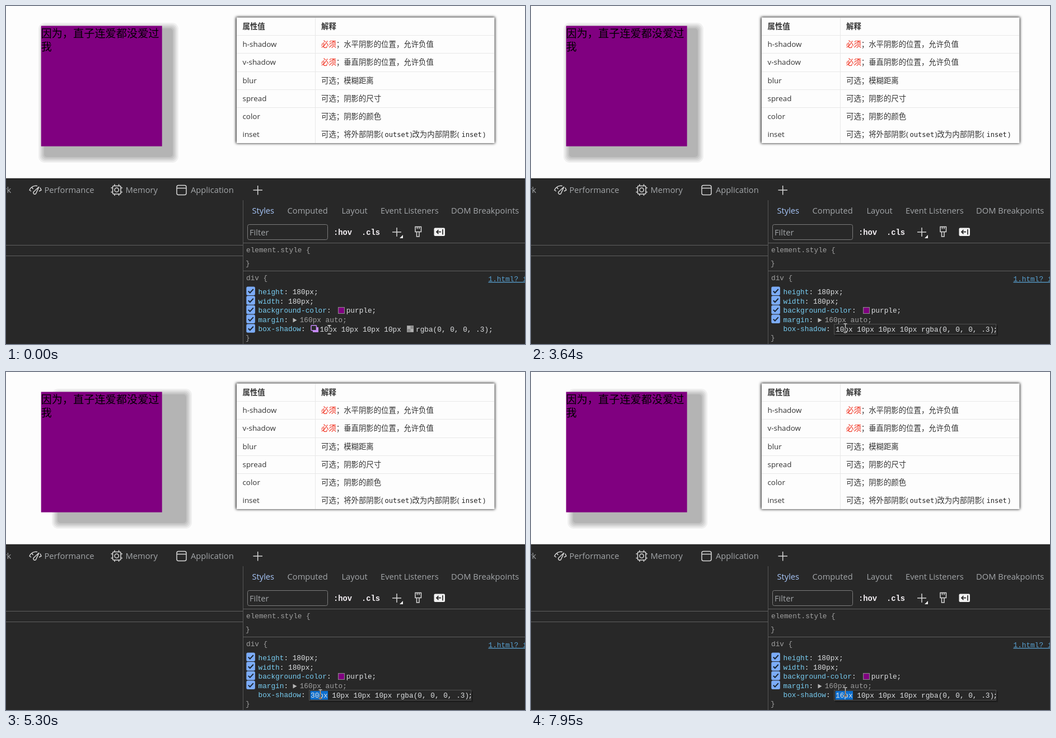
An HTML page for the animation above (8000 ms loop, 927x604 px).

```html
<!DOCTYPE html>
<html lang="zh-CN">
<head>
<meta charset="utf-8">
<title>box-shadow</title>
<style>
  html, body { margin: 0; width: 100%; height: 100%; overflow: hidden; background: #fdfdfd; }
  svg { display: block; width: 100vw; height: 100vh; }
  .cjk { font-family: 'Open Sans', 'Noto Sans CJK SC', 'Noto Sans CJK', sans-serif; font-size: 13.4px; fill: #333; }
  .big { font-size: 19.2px; fill: #000; }
  .ui { font-family: 'Open Sans', 'Noto Sans', sans-serif; font-size: 14.7px; fill: #a3a6a9; }
  .code { font-family: 'Liberation Mono', 'Noto Sans Mono', monospace; font-size: 12.75px; fill: #dcdee0; }
  .inline { font-family: 'DejaVu Sans Mono', monospace; font-size: 12.1px; fill: #222; }
  .button { font-size: 13.8px; font-weight: 700; fill: #f4f0f4; }
  .prop { fill: #78cdf2; }
  .dim { fill: #a0a0a0; }
  .link { fill: #58a0d0; text-decoration: underline; }
  .active { fill: #a8c7fa; }
  .must { fill: #f0220f; }
  .head { font-weight: 700; }
  .icon { fill: none; stroke: #d6d6d6; stroke-width: 1.5; }
  #cursor { fill: none; stroke: #fff; stroke-width: 1.3; mix-blend-mode: difference; }
</style>
</head>
<body>
<svg viewBox="0 0 927 604" preserveAspectRatio="none">
  <defs>
    <filter id="soft" x="-5%" y="-8%" width="110%" height="116%"><feGaussianBlur stdDeviation="2.8"/></filter>
  </defs>
  <rect width="927" height="604" fill="#fdfdfd"/>

  <g id="shadow"></g>
  <rect x="62.7" y="35.5" width="216" height="215.2" fill="purple"/>
  <text class="cjk big" x="62.5" y="55.5">因为，直子连爱都没爱过</text>
  <text class="cjk big" x="62.5" y="80.3">我</text>

  <rect x="411" y="20" width="462" height="225" filter="url(#soft)"/>
  <rect x="412" y="20.5" width="460.5" height="224.5" fill="#fdfdfd"/>
  <g id="table" class="cjk"></g>

  <rect y="307.8" width="927" height="297" fill="#282828"/>
  <path d="M0 427.5H424M0 446.5H424M424 423.5H927M424 473.5H927" stroke="#606060"/>
  <path d="M423.5 347V604" stroke="#565656"/>
  <rect x="431.5" y="390.5" width="143" height="27" rx="3" fill="none" stroke="#7c7c7c"/>
  <g id="labels" class="ui"></g>

  <g class="icon">
    <path d="M45 331l-3-2a12 12 0 0 1 14-7.5M61 324.5l2 4.5-4 2M46 324l2.5 3M50 331.5a2.6 2.6 0 1 0 4 2.5l5-11z"/>
    <rect x="190.5" y="321.5" width="14.5" height="14.5" rx="2"/>
    <circle cx="197.7" cy="328.7" r="3.6"/>
    <path d="M194 318.5v3M201.5 318.5v3M194 336v3M201.5 336v3M187.5 325h3M187.5 332.5h3M205 325h3M205 332.5h3"/>
    <rect x="305" y="320.5" width="17" height="17" rx="3"/>
    <path d="M305 325.5h17M441.5 329H458M449.7 321v16.5M690 404h16M698 396v16"/>
    <path d="M731 394.5h10.5v9H731zM734.5 394.5v4M738 394.5v4M733.5 403.5v8.5h4.5v-8.5"/>
  </g>
  <path d="M709 409v6h-6z" fill="#eee"/>
  <rect x="764.5" y="396.5" width="19.5" height="14.5" rx="2" fill="#f2f2f2"/>
  <path d="M780 399v9.500M777 403.700h-8M772.500 400.200L769 403.700l3.500 3.500" fill="none" stroke="#282828" stroke-width="1.7"/>

  <g id="code" class="code"></g>
  <g id="checks"></g>
  <rect x="593.5" y="538.500" width="11" height="11" fill="purple" stroke="#8d8d8d"/>
  <path d="M512.5 557.5v8l7-4z" fill="#b8b8b8"/>

  <g id="view">
    <path d="M548 574h10v9h-10z" fill="#c58af9"/>
    <rect x="545" y="570.7" width="9.5" height="9" rx="1" fill="#282828" stroke="#c58af9" stroke-width="1.5"/>
    <rect x="716.5" y="571.5" width="11" height="11" fill="#8b8b8b" stroke="#999"/>
    <path d="M717 572h5.5v5H717zM722.5 577h5.5v5h-5.5z" fill="#b0b0b0"/>
    <text class="code" x="560.5" y="581.5">10px 10px 10px 10px</text>
    <text class="code" x="732" y="581.5">rgba(0, 0, 0, .3);</text>
  </g>
  <g id="edit">
    <rect x="543" y="571" width="291" height="19" fill="#1e1e1e"/>
    <rect x="541.5" y="568.5" width="289" height="18" fill="#282828" stroke="#505050"/>
    <rect id="pick" x="543.5" y="570" height="15.5" fill="#0c6fd0"/>
    <text id="value" class="code" x="544" y="581.5"></text>
    <text class="code" x="825.5" y="581.5">;</text>
  </g>
  <path id="cursor" d="M-3 -7.5h2.5l.5 .5 .5-.5h2.5M0 -7v14M-3 7.500h2.500l.5-.5 .5 .5h2.500"/>
</svg>
<script>
const LOOP = 8000, ZOOM = 1.2, CHAR = 7.65;
const $ = id => document.getElementById(id);
const list = (n, f) => Array.from({ length: n }, (_, i) => f(i));
const text = (x, y, s, cls = '') => `<text x="${x}" y="${y}" class="${cls}">${s}</text>`;
const span = (x, s, cls = '') => `<tspan x="${x}" class="${cls}">${s}</tspan>`;

// Soft shadow as nested bands, light to dark
$('shadow').innerHTML = list(5, i => {
  const out = 5 - 2.5 * i, side = 240 + 2 * out, grey = 240 - 15 * i;
  return `<rect x="${63 - out}" y="${35 - out}" width="${side}" height="${side}" rx="${11 - 1.5 * i}" fill="rgb(${grey},${grey},${grey})"/>`;
}).join('');

const must = '<tspan class="must">必须</tspan>；';
const rows = [
  ['属性值', '解释'],
  ['h-shadow', must + '水平阴影的位置，允许负值'],
  ['v-shadow', must + '垂直阴影的位置，允许负值'],
  ['blur', '可选；模糊距离'],
  ['spread', '可选；阴影的尺寸'],
  ['color', '可选；阴影的颜色'],
  ['inset', '可选；将外部阴影(' + span(676.5, 'outset', 'inline') + span(721.5, ')改为内部阴影(')
    + span(813.5, 'inset', 'inline') + span(852, ')')]
];
$('table').innerHTML = '<path d="M552.5 21V245" stroke="#e8e8e8"/>' + rows.map(([name, note], i) => {
  const y = 41 + i * 32.2, cls = i ? '' : 'head';
  const line = i && i < 6 ? `<path d="M412 ${Math.round(y - 21) + .5}H872" stroke="#e8e8e8"/>` : '';
  return line + text(422.5, y, name, cls) + text(563, y, note, cls);
}).join('');

$('labels').innerHTML =
  text(-4.5, 334, 'rk') + text(68.5, 334, 'Performance') +
  text(213.5, 334, 'Memory') + text(330, 334, 'Application') +
  text(439.5, 371, 'Styles', 'active') + text(502.5, 371, 'Computed') +
  text(599.5, 371, 'Layout') + text(669, 371, 'Event Listeners') +
  text(795, 371, 'DOM Breakpoints') + text(435, 410, 'Filter');

// Property, value, room for an icon between them
const rules = [
  ['height', '180px;', 0], ['width', '180px;', 0], ['background-color', 'purple;', 19.5],
  ['margin', '160px auto;', 13, 'dim'], ['box-shadow', '', 0]
];
$('code').innerHTML =
  text(585, 409, ':hov', 'button') + text(635, 409, '.cls', 'button') +
  text(429, 440, 'element.style {', 'dim') + text(428, 464, '}', 'dim') +
  text(429, 490, 'div {', 'dim') + text(861.5, 492, '1.html? i', 'link') +
  rules.map(([name, value, gap, cls], i) => {
    const y = 515 + 16.6 * i;
    return text(450.5, y, `<tspan class="prop">${name}</tspan>:`) +
      text(450.5 + (name.length + 2) * CHAR + gap, y, value, cls);
  }).join('') +
  text(428, 597, '}', 'dim');

$('checks').innerHTML = rules.map((_, i) =>
  `<g transform="translate(437.3 ${509.2 + 16.7 * i})">
    <rect x="-8" y="-7.8" width="15.6" height="15.6" rx="2.5" fill="#7cacf8"/>
    <path d="M-4.5 .3l3 3 6-6.5" fill="none" stroke="#1c2733" stroke-width="2"/></g>`).join('');

// Wheel bursts as [start, length, change]: even turns up, then slower ones down
const bursts = [
  ...list(6, i => [3950 + 314 * i, 110, 4]),
  [5790, 530, -5], [6480, 210, -3], [6930, 120, -5], [7230, 110, -3], [7540, 1, -1], [7920, 1, -1]
];
const offsetAt = t => bursts.reduce((sum, [start, length, change]) => {
  if (t < start) return sum;
  const n = Math.abs(change);
  return sum + Math.sign(change) * Math.min(n, 1 + Math.floor((t - start) / length * n));
}, 10);

const ramp = (t, from, to) => Math.min(1, Math.max(0, (t - from) / (to - from)));

function pointerAt(t) {
  const dip = ramp(t, 510, 1610), glide = ramp(t, 2990, 3640), lift = ramp(t, 7540, 7920);
  const x = 577 - 2 * dip + 4 * Math.sin(2 * Math.PI * dip) - 14 * glide;
  const y = 578 + 17 * Math.sin(Math.PI * dip) - 3 * glide - 4 * lift;
  return [x, y].map(n => Math.round(n) + .5);
}

function draw(t) {
  const offset = offsetAt(t), editing = t >= 2500;
  $('shadow').setAttribute('transform', `translate(${(offset - 10) * ZOOM} 0)`);
  $('view').style.display = $('checks').lastChild.style.display = editing ? 'none' : '';
  $('edit').style.display = editing ? '' : 'none';
  $('pick').setAttribute('width', t < 2990 ? 283 : t < 3950 ? 0 : 31.5);
  $('value').textContent = offset + 'px 10px 10px 10px rgba(0, 0, 0, .3)';
  $('cursor').setAttribute('transform', `translate(${pointerAt(t)})`);
}

const start = performance.now();
function tick() {
  draw((performance.now() - start) % LOOP);
  requestAnimationFrame(tick);
}
tick();
</script>
</body>
</html>
```
